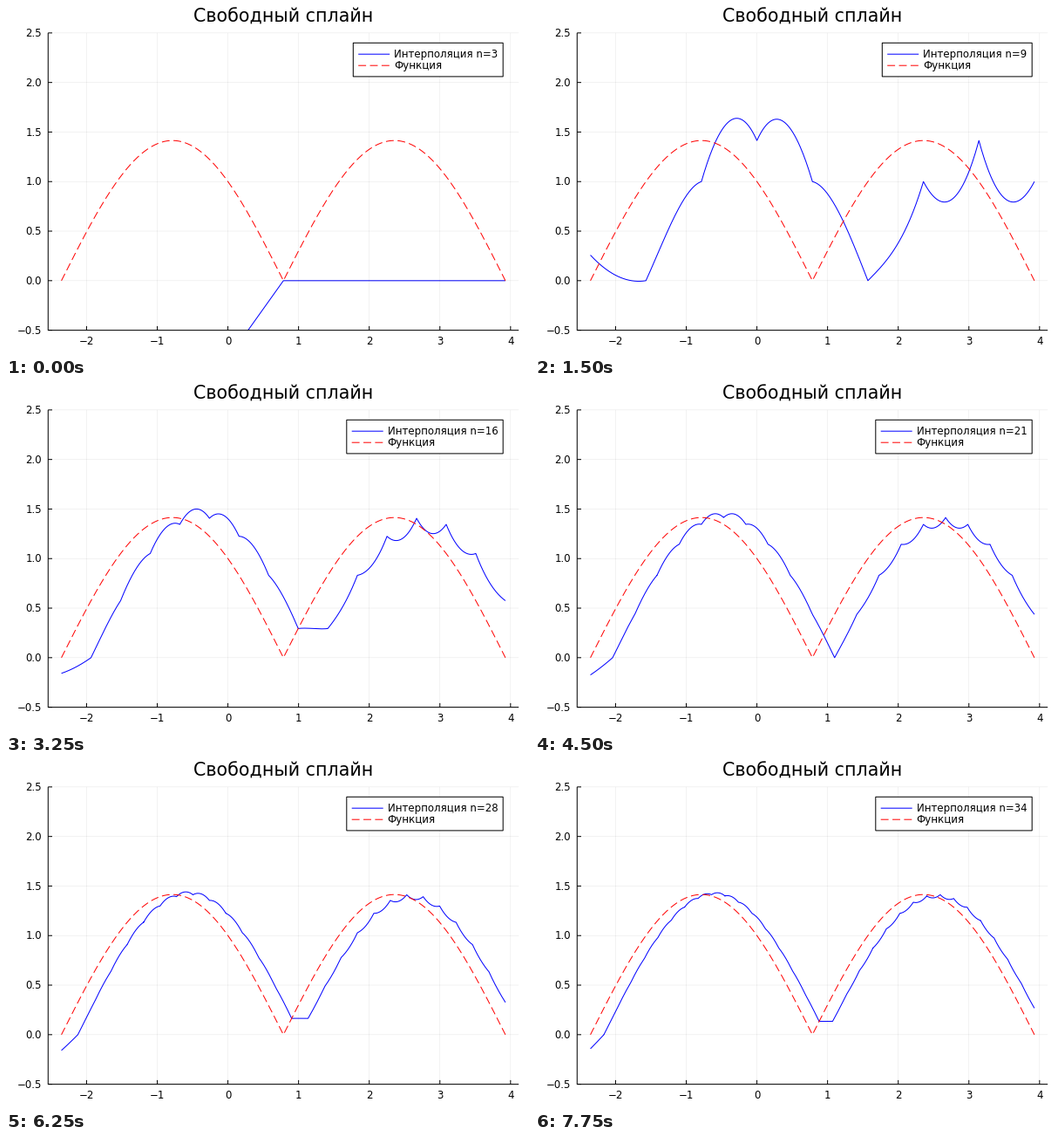
Write a matplotlib script that moves like this. It is 600 px wide and 400 px high and loops after 8000 ms.

```python
import numpy as np
import matplotlib.pyplot as plt
from matplotlib.animation import FuncAnimation
from matplotlib.patches import Rectangle

W, H, DPI = 600, 400, 100
LEFT, RIGHT, TOP, BOTTOM = 48.3, 588.2, 30.87, 371.6
X0, X1 = -3 * np.pi / 4, 5 * np.pi / 4
PAD = 0.03 * (X1 - X0)
FIRST_N, FRAMES, INTERVAL = 3, 32, 250
LINE = 0.72  # one pixel in points
TICK = 4.7
SMALL, LARGE = 8.5, 14.9
DASHED = dict(dashes=(8.9, 4.45), dash_capstyle="butt")

plt.rcParams["font.family"] = "DejaVu Sans"
plt.rcParams["path.snap"] = False


def wave(x):
    return np.cos(x) - np.sin(x)


def spline(n, samples=60):
    """Piecewise cubic, each piece anchored at its right-hand knot."""
    knots = np.linspace(X0, X1, n)
    h = knots[1] - knots[0]
    g = wave(knots[:-1])
    f = np.abs(g)
    m = n - 1

    matrix = 4 * np.eye(m) + np.eye(m, k=1) + np.eye(m, k=-1)
    c = np.linalg.solve(matrix, -48 * (1 - np.cos(h)) / h**2 * g)
    d = np.zeros(m)
    d[1:] = np.diff(c) / h
    b = np.empty(m)
    b[0] = 1 - np.pi / 4 * c[0]
    b[1:] = np.diff(f) / h + h * (c[1:] / 3 + c[:-1] / 6)

    u = np.linspace(-h, 0, samples)
    xs = knots[1:, None] + u
    ys = (f[:, None] + b[:, None] * u + c[:, None] / 2 * u**2
          + d[:, None] / 6 * u**3)
    return xs.ravel(), ys.ravel()


fig = plt.figure(figsize=(W / DPI, H / DPI), dpi=DPI, facecolor="white")
ax = fig.add_axes([LEFT / W, 1 - BOTTOM / H,
                   (RIGHT - LEFT) / W, (BOTTOM - TOP) / H], zorder=1)
ax.set_xlim(X0 - PAD, X1 + PAD)
ax.set_ylim(-0.5, 2.5)
ax.axis("off")

# Overlay in pixel coordinates, y pointing down.
page = fig.add_axes([0, 0, 1, 1], zorder=2)
page.set_xlim(0, W)
page.set_ylim(H, 0)
page.axis("off")


def label(x, y, text, size=SMALL, ha="left"):
    return page.text(x, y, text.replace("-", "\u2212"), size=size, ha=ha,
                     va="baseline", color="black")


def segment(xs, ys, color="black", lw=LINE, **style):
    return page.plot(xs, ys, color=color, lw=lw, solid_capstyle="butt",
                     **style)[0]


def to_px(x, y):
    px = LEFT + (x - X0 + PAD) / (X1 - X0 + 2 * PAD) * (RIGHT - LEFT)
    return px, BOTTOM - (y + 0.5) / 3 * (BOTTOM - TOP)


# Grid, ticks and axis lines
grid = dict(lw=LINE / 2, alpha=0.1)
for t in range(-2, 5):
    x = to_px(t, 0)[0]
    segment([x, x], [TOP, BOTTOM], **grid)
    segment([x, x], [BOTTOM - TICK, BOTTOM])
    label(x, 387.5, str(t), ha="center")
for t in np.arange(-0.5, 2.6, 0.5):
    y = to_px(0, t)[1]
    segment([LEFT, RIGHT], [y, y], **grid)
    segment([LEFT, LEFT + TICK], [y, y])
    label(41, y + 4.1, f"{t:.1f}", ha="right")
segment([LEFT, LEFT, RIGHT], [TOP, BOTTOM, BOTTOM])
label((LEFT + RIGHT) / 2, 18.2, "Свободный сплайн", LARGE, "center")

# Curves
curve, = ax.plot([], [], color="blue", lw=LINE, solid_capstyle="butt")
xs = np.linspace(X0, X1, 801)
ax.plot(xs, np.abs(wave(xs)), color="red", lw=LINE, **DASHED)

# Legend, its left edge follows the width of the text
box = page.add_patch(Rectangle((398.5, 42.3), 172, 38.6, fc="white",
                               ec="black", lw=LINE, zorder=2))
blue_key = segment([], [], "blue", zorder=3)
red_key = segment([], [], "red", zorder=3, **DASHED)
blue_text = label(0, 59.3, "")
red_text = label(0, 72.4, "Функция")


def draw(i):
    n = FIRST_N + i
    curve.set_data(*spline(n))
    left = 398.3 if n < 10 else 390.8
    box.set_x(left)
    box.set_width(570.2 - left)
    key = [left + 5.9, left + 41.9]
    blue_key.set_data(key, [55.2, 55.2])
    red_key.set_data(key, [68.2, 68.2])
    blue_text.set_x(left + 46.9)
    red_text.set_x(left + 46.9)
    blue_text.set_text(f"Интерполяция n={n}")
    return curve, box, blue_key, red_key, blue_text, red_text


anim = FuncAnimation(fig, draw, frames=FRAMES, interval=INTERVAL,
                     init_func=lambda: draw(0), repeat=True, repeat_delay=0)
plt.show()
```
